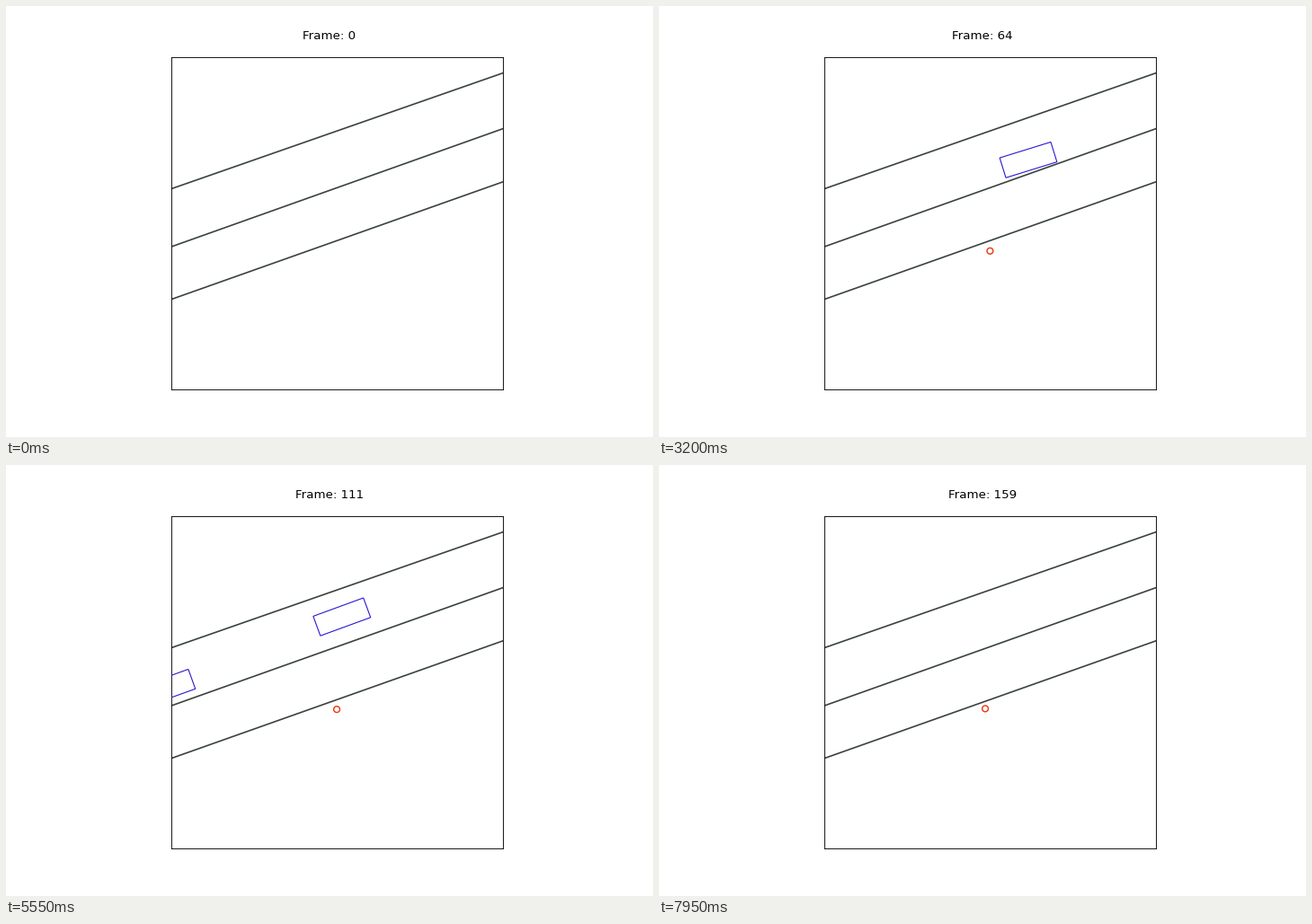
Animation of 720x480 px, one loop 8 s. Source, as a matplotlib script:

```python
import numpy as np
import matplotlib.pyplot as plt
from matplotlib.animation import FuncAnimation
from matplotlib.patches import Circle, Polygon

FRAMES, INTERVAL = 160, 50
W, H = 720, 480
LEFT, RIGHT, TOP, BOTTOM = 184.2, 553.4, 57.4, 427.2
CAR_LENGTH, CAR_WIDTH = 59.5, 23.2

fig = plt.figure(figsize=(W / 80, H / 80), dpi=80, facecolor="white")
ax = fig.add_axes([LEFT / W, 1 - BOTTOM / H,
                   (RIGHT - LEFT) / W, (BOTTOM - TOP) / H])
# Data units are stage pixels, y pointing down.
ax.set(xlim=(LEFT, RIGHT), ylim=(BOTTOM, TOP), xticks=[], yticks=[])

for start, end in [(203.5, 74.5), (268, 136.5), (326.6, 195.7)]:
    ax.plot([LEFT, RIGHT], [start, end], color="#3a443c", lw=1.5)

title = fig.text(0.5, 0.922, "", ha="center", fontsize=12,
                 family="DejaVu Sans")


class Car:
    """Rectangle driving along a gentle curve; angles in degrees."""

    def __init__(self, t0, pos, speed, accel, heading, turn=0):
        self.t0, self.accel = t0, accel
        self.pos, self.speed = np.array(pos), np.array(speed)
        self.heading, self.turn = heading, turn
        self.patch = ax.add_patch(Polygon(
            np.zeros((4, 2)), fill=False, ec="#2a18d0", lw=1, zorder=3))

    def move(self, n):
        k = n - self.t0
        center = self.pos + self.speed * k + np.array([self.accel, 0]) * k**2
        a = np.radians(self.heading + self.turn * k)
        along = np.array([np.cos(a), -np.sin(a)]) * CAR_LENGTH / 2
        across = np.array([np.sin(a), np.cos(a)]) * CAR_WIDTH / 2
        self.patch.set_xy([center - along - across, center + along - across,
                           center + along + across, center - along + across])
        self.patch.set_visible(n > 0)


def walk(n):
    """Pedestrian waits, leans towards the road once, then drifts left."""
    x = 368.4 - 0.105 * max(0, n - 108)
    y = 272.9 - 0.016 * (n - 64) - 6 * np.exp(-((n - 31) / 16) ** 2)
    return x, y


cars = [
    Car(87, (300.2, 209.1), (-4.935, 1.64), -0.00513, 18.5, 0.055),
    Car(111, (373.8, 169.1), (-5.448, 1.905), 0.00338, 20.1),
]
walker = ax.add_patch(Circle((0, 0), 3.4, fill=False, ec="#e63c14",
                             lw=1.3, zorder=4))


def draw(n):
    title.set_text(f"Frame: {n}")
    for car in cars:
        car.move(n)
    walker.center = walk(n)
    walker.set_visible(n > 0)
    return [title, walker] + [car.patch for car in cars]


anim = FuncAnimation(fig, draw, frames=FRAMES, interval=INTERVAL,
                     repeat=True, repeat_delay=0)
plt.show()
```
